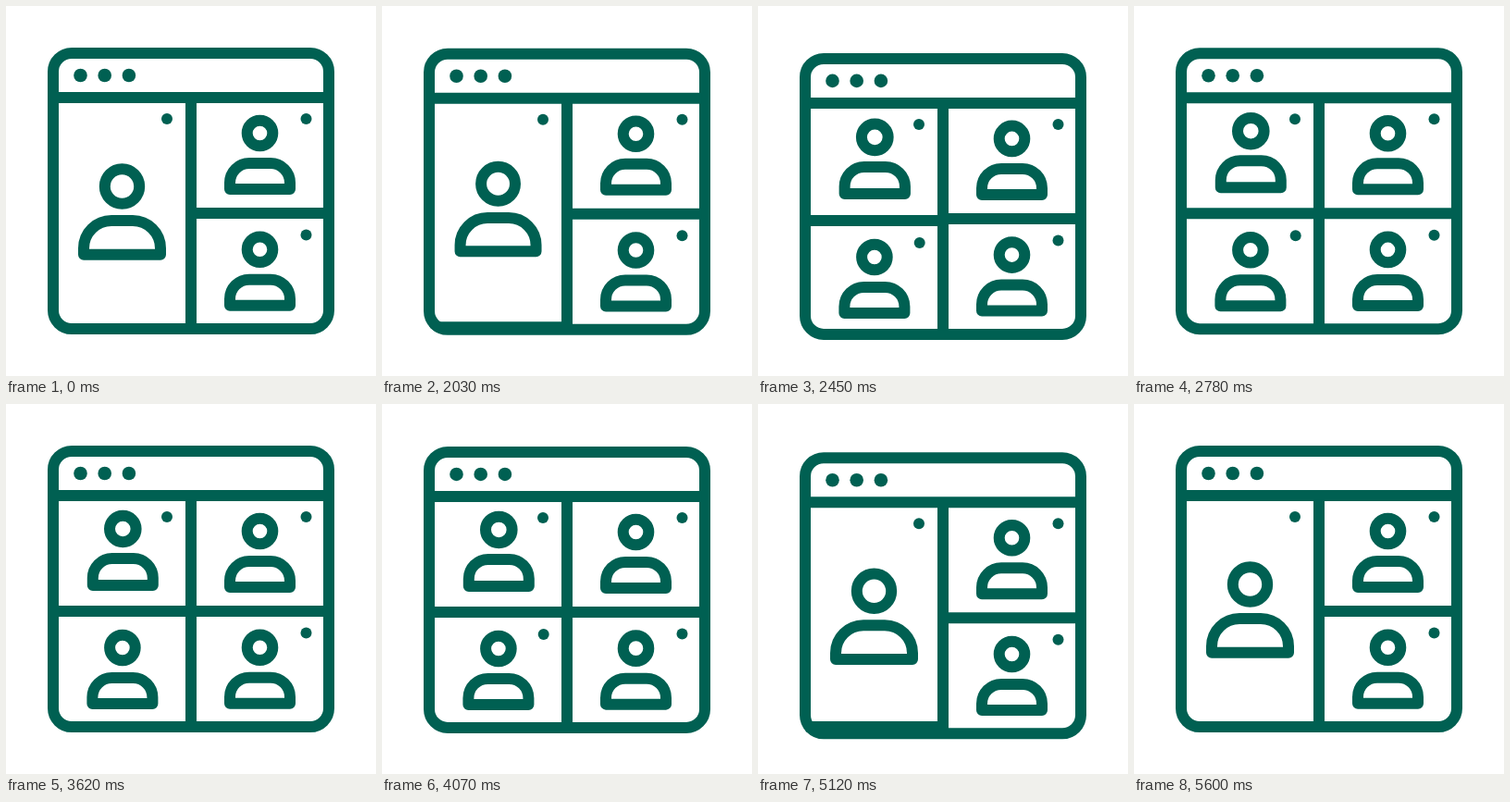
Recreate the animation shown at these times as an HTML page with a canvas. Size 400 by 400 pixels, loop 5630 ms.

```html
<!DOCTYPE html>
<html lang="en">
<head>
<meta charset="utf-8">
<title>Video call layout</title>
<style>
  html, body { margin: 0; width: 100%; height: 100%; overflow: hidden; background: #fff; }
  canvas { display: block; width: 100vmin; height: 100vmin; }
</style>
</head>
<body>
<canvas id="stage" width="400" height="400"></canvas>
<script>
const ctx = document.getElementById('stage').getContext('2d');
const COLOR = '#006052';
const LOOP = 5630, STEP = 30, PHASE = 20;
const SPLIT_AT = 1990, NUDGE_AT = 3725, MERGE_AT = 4690, FIRST_MOVE = 2030;
const PANEL_TRAVEL = 130;

const LARGE = { x: 125.5, headY: 195, headR: 18.7, half: 41.5, top: 232, bottom: 268.8, round: 30 };
const SMALL = { x: 126.3, headY: 135, headR: 14.3, half: 32.5, top: 167, bottom: 196, round: 21 };
const GUEST = { x: 274.5, headY: 137.5, headR: 13.8, half: 32.5, top: 170, bottom: 198, round: 21 };

const BLINKS = {
  lowerLeft: [[3140, 3320], [3620, 3800]],
  upperRight: [[4310, 4520]],
  upperLeft: [[4790, 4970]]
};

const clamp = v => Math.min(1, Math.max(0, v));
const lerp = (a, b, p) => a + (b - a) * p;
const isLit = (name, t) => !BLINKS[name].some(([off, on]) => t >= off && t < on);

// Cubic Bezier (.25, .1, .25, 1), solved for x by bisection.
function ease(x) {
  if (x <= 0 || x >= 1) return clamp(x);
  const curve = (s, a, b) => 3 * s * (1 - s) ** 2 * a + 3 * s * s * (1 - s) * b + s ** 3;
  let lo = 0, hi = 1;
  for (let i = 0; i < 24; i++) {
    const mid = (lo + hi) / 2;
    if (curve(mid, 0.25, 0.25) < x) lo = mid; else hi = mid;
  }
  return curve(lo, 0.1, 1);
}

// Smooth rise to a peak, then a long decaying return.
function bump(t, height, peak) {
  const u = t / peak;
  if (u <= 0 || u > 3.3) return 0;
  return height * (u < 1 ? u * u * (3 - 2 * u) : (u * Math.exp(1 - u)) ** 5);
}

function dot(x, y, r) {
  ctx.beginPath();
  ctx.arc(x, y, r, 0, Math.PI * 2);
  ctx.fill();
}

function line(x1, y1, x2, y2) {
  ctx.beginPath();
  ctx.moveTo(x1, y1);
  ctx.lineTo(x2, y2);
  ctx.stroke();
}

function frame(x, y, w, h, r) {
  ctx.beginPath();
  ctx.roundRect(x, y, w, h, r);
}

function person(p, dx = 0, dy = 0) {
  ctx.beginPath();
  ctx.arc(p.x + dx, p.headY + dy, p.headR, 0, Math.PI * 2);
  ctx.stroke();
  frame(p.x + dx - p.half, p.top + dy, p.half * 2, p.bottom - p.top, [p.round, p.round, 0, 0]);
  ctx.stroke();
}

function blend(a, b, p) {
  return Object.fromEntries(Object.keys(a).map(k => [k, lerp(a[k], b[k], p)]));
}

function draw(t) {
  if (t < FIRST_MOVE) t = 0;
  const merging = t >= MERGE_AT;
  const shrink = merging ? 1 - ease((t - MERGE_AT) / 450) : ease((t - SPLIT_AT) / 550);
  const shown = merging ? 1 - ease((t - MERGE_AT) / 680) : ease((t - SPLIT_AT) / 550);
  const drop = bump(t - SPLIT_AT, 13, 275) + bump(t - NUDGE_AT, 4, 175) + bump(t - MERGE_AT, 13, 275);
  const slide = PANEL_TRAVEL * (1 - shown);

  ctx.setTransform(1, 0, 0, 1, 0, 0);
  ctx.fillStyle = '#fff';
  ctx.fillRect(0, 0, 400, 400);
  ctx.translate(0, drop);
  ctx.fillStyle = ctx.strokeStyle = COLOR;
  ctx.lineWidth = 12;
  ctx.lineJoin = 'round';

  person(blend(LARGE, SMALL, shrink));
  if (isLit('upperLeft', t)) dot(174, 122, 6);

  // Sliding panel, cut off by the window's outline.
  if (shown > 0) {
    ctx.save();
    frame(45, 45, 310, 310, 26);
    ctx.clip();
    line(51, 224 + slide, 200, 224 + slide);
    person(GUEST, -148.6, 126 + slide);
    if (isLit('lowerLeft', t)) dot(174.7, 248 + slide, 6);
    ctx.restore();
  }

  person(GUEST);
  person(GUEST, 0, 125.7);
  if (isLit('upperRight', t)) dot(324.5, 122, 6);
  dot(324.5, 247.5, 6);

  line(51, 99, 349, 99);
  line(200, 99, 200, 349);
  line(200, 224, 349, 224);
  for (let i = 0; i < 3; i++) dot(80.5 + i * 26.2, 75, 7.3);
  frame(51, 51, 298, 298, 20);
  ctx.stroke();
}

const start = performance.now();
function tick() {
  const t = (performance.now() - start) % LOOP;
  draw(Math.max(0, Math.floor((t - PHASE) / STEP) * STEP + PHASE));
  requestAnimationFrame(tick);
}
tick();
</script>
</body>
</html>
```
